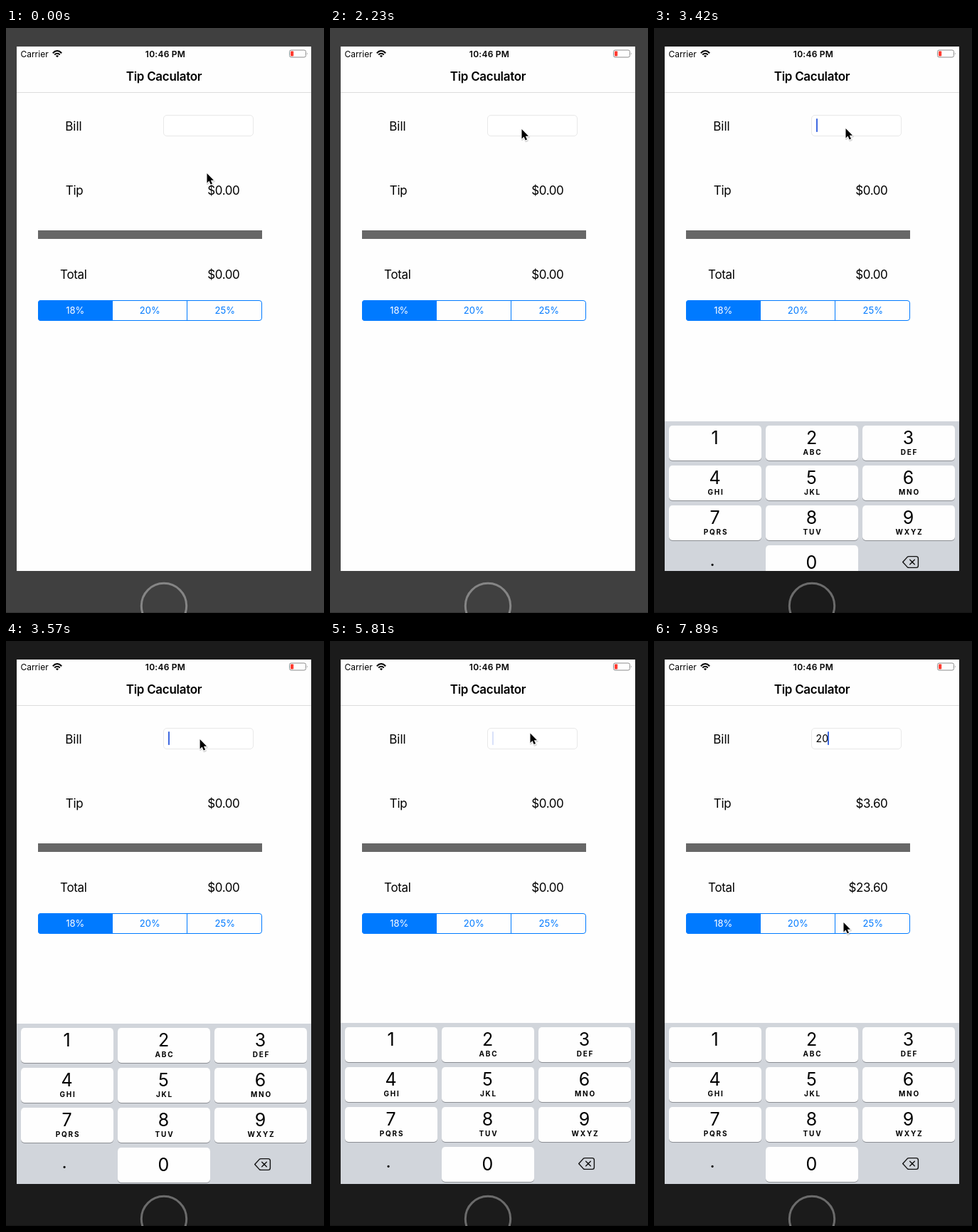
Animation of 447x821 px, one loop 8 s. Source, as an HTML page:

```html
<!DOCTYPE html>
<html lang="en">
<head>
<meta charset="utf-8">
<title>Tip Caculator</title>
<style>
  html, body { margin: 0; width: 100%; height: 100%; overflow: hidden; background: #404040; }
  svg { display: block; font-family: Inter, Roboto, sans-serif; }
  .label { font-size: 17px; letter-spacing: -.35px; }
  .sum { text-anchor: end; }
  .mid { text-anchor: middle; }
  .seg { font-size: 13px; fill: #007aff; }
  .digit { font-size: 25px; }
  .sub { font-size: 10px; font-weight: 700; letter-spacing: 1.8px; }
</style>
</head>
<body>
<svg width="447" height="821" viewBox="0 0 447 821">
  <defs><clipPath id="screen"><rect x="15" y="26" width="414" height="736"/></clipPath></defs>
  <rect id="bezel" width="447" height="821"/>
  <rect y="820" width="447" height="1" fill="#000" opacity=".25"/>
  <circle id="home" cx="222" cy="811" r="31.7" fill="none" stroke-width="3"/>

  <g clip-path="url(#screen)">
    <rect x="15" y="26" width="414" height="736" fill="#fefefe"/>

    <text x="20.4" y="41" font-size="12">Carrier</text>
    <g fill="none" stroke="#000" stroke-width="2">
      <path d="M65.8 35.2Q72 29 78.2 35.2"/>
      <path d="M68.2 37.6Q72 34 75.8 37.6"/>
    </g>
    <path d="M72 41.2L69.9 39.1Q72 37.4 74.1 39.1Z"/>
    <text class="mid" x="224" y="41" font-size="12" font-weight="600" letter-spacing=".25">10:46 PM</text>
    <rect x="398.5" y="31" width="23" height="10" rx="2.4" fill="none" stroke="#8c8c8c"/>
    <path d="M423 34.3Q424.6 36 423 37.7Z" fill="#8c8c8c"/>
    <rect x="400" y="32.5" width="4.2" height="7" rx=".8" fill="#ff3b30"/>

    <text class="mid" x="222" y="74" font-size="17" font-weight="600" letter-spacing="-.3">Tip Caculator</text>
    <rect x="15" y="90" width="414" height="1" fill="#dcdcdc"/>

    <g class="label">
      <text class="mid" x="95" y="144" letter-spacing="0">Bill</text>
      <text class="mid" x="96" y="234">Tip</text>
      <text class="mid" x="94.8" y="352">Total</text>
      <text id="tip" class="sum" x="328.5" y="234"></text>
      <text id="total" class="sum" x="328.5" y="352"></text>
    </g>
    <rect x="221.5" y="122.5" width="126" height="29" rx="4.5" fill="#fff" stroke="#e8e8e8"/>
    <text id="bill" x="227.6" y="142" font-size="14"></text>
    <rect id="caret" y="127" width="2" height="19" rx=".8" fill="#3f69e0"/>

    <rect x="45" y="284" width="315" height="12" fill="#676767"/>
    <path d="M150 382H49a4 4 0 0 0-4 4v21a4 4 0 0 0 4 4H150Z" fill="#007aff"/>
    <rect x="45.5" y="382.5" width="314" height="28" rx="3.5" fill="none" stroke="#007aff"/>
    <path d="M254.5 382V411" stroke="#007aff"/>
    <g class="seg mid">
      <text x="97.3" y="401" style="fill:#fff">18%</text>
      <text x="202.3" y="401">20%</text>
      <text x="307.7" y="401">25%</text>
    </g>

    <g id="pad"><rect x="15" width="414" height="226" fill="#d1d5db"/></g>
  </g>

  <g id="mouse">
    <path d="M0 0V13.4L3 10.6L5.2 15.6L7.5 14.6L5.3 9.8H9.5Z" transform="translate(.6 1.4)" fill="#000" stroke="#000" stroke-width="2.6" stroke-linejoin="round" opacity=".14"/>
    <path d="M0 0V13.4L3 10.6L5.2 15.6L7.5 14.6L5.3 9.8H9.5Z" stroke="#fff" stroke-width="1.8" stroke-linejoin="round" paint-order="stroke"/>
  </g>
</svg>
<script>
const LOOP = 8000, PAD_TOP = 536;
const $ = id => document.getElementById(id);

function add(parent, tag, attrs, text = '') {
  const el = document.createElementNS('http://www.w3.org/2000/svg', tag);
  for (const k in attrs) el.setAttribute(k, attrs[k]);
  el.textContent = text;
  parent.append(el);
}

function buildPad() {
  const pad = $('pad');
  const subs = ['', 'ABC', 'DEF', 'GHI', 'JKL', 'MNO', 'PQRS', 'TUV', 'WXYZ'];
  const key = (col, row, digit, sub, base) => {
    const x = 21 + col * 136, y = 6 + row * 56;
    add(pad, 'rect', { x, y: y + 1, width: 130, height: 49, rx: 5, fill: '#8b8e93' });
    add(pad, 'rect', { x, y, width: 130, height: 49, rx: 5, fill: '#fefefe' });
    add(pad, 'text', { class: 'digit mid', x: x + 64.5, y: y + base }, digit);
    if (sub) add(pad, 'text', { class: 'sub mid', x: x + 66, y: y + 41 }, sub);
  };
  subs.forEach((s, i) => key(i % 3, Math.floor(i / 3), i + 1, s, 26));
  key(1, 3, 0, '', 32.5);
  add(pad, 'text', { class: 'digit mid', x: 82, y: 203 }, '.');
  add(pad, 'path', {
    d: 'M349.7 197.5L356 190.6Q357 189.6 358.5 189.6H368.5Q371.4 189.6 371.4 192.5V202.5Q371.4 205.4 368.5 205.4H358.5Q357 205.4 356 204.4ZM359.7 194.2L366.3 200.8M366.3 194.2L359.7 200.8',
    fill: 'none', stroke: '#111', 'stroke-width': 1.4, 'stroke-linejoin': 'round', 'stroke-linecap': 'round'
  });
}

// start, end, steps, x, y, sideways bulge
const moves = [
  [150, 150, 1, 283, 203, 0],
  [740, 890, 2, 286.5, 210, 0],
  [1190, 2230, 8, 269.5, 142, 0],
  [3420, 3420, 1, 269.5, 141, 0],
  [3570, 3870, 3, 281.5, 129.5, 0],
  [7150, 7890, 6, 266.5, 395, 13]
];
const blink = [
  [0, 0], [3270, 1], [3720, .2], [3870, 0], [4320, 1], [4760, .2], [4910, 0],
  [5210, .5], [5360, 1], [5810, .2], [5960, 0], [6250, .5], [6400, 1],
  [7150, .2], [7300, 0], [7600, .5], [7750, 1]
];
const slide = [[0, 226], [3270, 150], [3420, 16], [3570, 1], [3720, 0]];
const typed = [[0, ''], [6400, '2'], [6550, '20']];

const at = (track, t) => track.reduce((v, [time, value]) => t >= time ? value : v, track[0][1]);

function mouseAt(t) {
  let x = 282.5, y = 204;
  for (const [t0, t1, n, tx, ty, bulge] of moves) {
    if (t < t0) break;
    const step = n > 1 ? (t1 - t0) / (n - 1) : 1;
    const p = Math.min(1, (Math.floor((t - t0) / step + .03) + 1) / n);
    const u = p * p * (3 - 2 * p);
    x += (tx - x) * u + bulge * 4 * u * (1 - u);
    y += (ty - y) * u;
  }
  return [x, y];
}

function draw(t) {
  const lit = t < 2980, bill = at(typed, t), amount = Number(bill);
  $('bezel').setAttribute('fill', lit ? '#404040' : '#1b1b1b');
  $('home').setAttribute('stroke', lit ? '#858585' : '#6b6b6b');
  $('pad').setAttribute('transform', `translate(0 ${PAD_TOP + at(slide, t)})`);
  $('bill').textContent = bill;
  $('tip').textContent = '$' + (amount * .18).toFixed(2);
  $('total').textContent = '$' + (amount * 1.18).toFixed(2);
  $('caret').setAttribute('x', 228 + bill.length * 8);
  $('caret').setAttribute('opacity', at(blink, t));
  $('mouse').setAttribute('transform', `translate(${mouseAt(t).join(' ')})`);
}

buildPad();
draw(0);
const start = performance.now();
(function tick() {
  draw((performance.now() - start) % LOOP);
  requestAnimationFrame(tick);
})();
</script>
</body>
</html>
```
